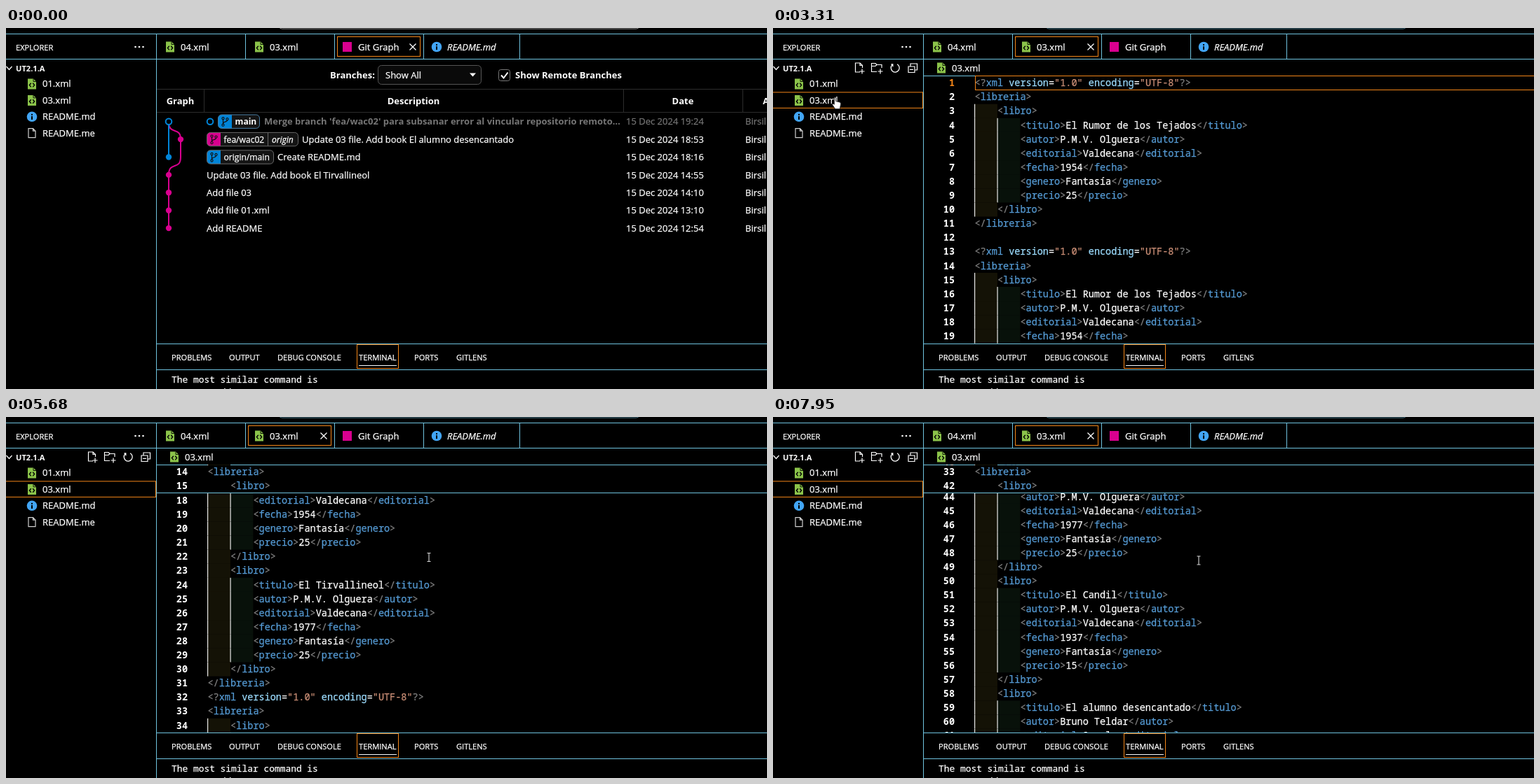
These frames come from a looping animation (1085x516 px, 8000 ms). An HTML page:

```html
<!DOCTYPE html>
<html lang="es">
<head>
<meta charset="utf-8">
<title>Editor</title>
<style>
html, body { margin: 0; width: 100%; height: 100%; overflow: hidden; background: #000; }
svg { display: block; width: 100vw; height: 100vh; }
text { font: 13px "Open Sans", "Noto Sans", sans-serif; color: #fff; fill: currentColor;
  stroke: currentColor; stroke-width: .25px; white-space: pre; }
.b { font-weight: 700; stroke-width: 0; }
.i { font-style: italic; }
.caps { font-size: 11.1px; }
.label { font-size: 12.1px; }
.mono { font: 13.52px "Noto Sans Mono", "DejaVu Sans Mono", monospace; }
.term { font: 12.9px "Noto Sans Mono", "DejaVu Sans Mono", monospace; }
.num { font-weight: 700; text-anchor: end; stroke-width: 0; }
.mid { text-anchor: middle; }
.dim { color: #757575; }
.act { color: #f38518; }
.br { color: #808080; } .tag { color: #569cd6; } .attr { color: #9cdcfe; } .str { color: #ce9178; }
</style>
</head>
<body>
<svg id="stage" viewBox="0 0 1085 516" preserveAspectRatio="none"></svg>
<script>
const BLUE = '#6fc3df', ORANGE = '#f38518', NODE = '#0085d9', PINK = '#d9008f';
const LH = 20.1, CW = 8.112, TOP = 68.5, LEFT = 287.5;
const LOOP = 8000, CLICK = 2580, OPEN = 2670, LOADED = 2840;

const text = (x, y, s, cls = '') => `<text x="${x}" y="${y + 4.7}" class="${cls}">${s}</text>`;
const path = (d, stroke, w = 1, extra = '') =>
  `<path d="${d}" fill="none" stroke="${stroke}" stroke-width="${w}" ${extra}/>`;
const rect = (x, y, w, h, fill, extra = '') =>
  `<rect x="${x}" y="${y}" width="${w}" height="${h}" fill="${fill}" ${extra}/>`;
const frame = (x, y, w, h, stroke, extra = '') =>
  rect(x + .5, y + .5, w - 1, h - 1, 'none', `stroke="${stroke}" ${extra}`);
const hline = (x, y, w, c) => rect(x, y, w, 1, c);
const vline = (x, y, h, c) => rect(x, y, 1, h, c);
const group = (id, body, extra = '') => `<g id="${id}" ${extra}>${body}</g>`;
const at = (x, y, body) => `<g transform="translate(${x} ${y})">${body}</g>`;

// Icons, each drawn around its centre
const xmlIcon = (x, y) => at(x, y,
  '<path d="M-6-7.5H2L6-3.5V7.5H-6Z" fill="#8bc34a"/>' +
  path('M2-7.5V-3.5H6', '#000', .9) +
  path('M-1.2-1.2L-3.6 1.6L-1.2 4.4M1.2-1.2L3.6 1.6L1.2 4.4', '#000', 1.4));
const infoIcon = (x, y) => at(x, y, '<circle r="7.3" fill="#42a5f5"/>' +
  rect(-1, -4, 2, 2, '#000') + rect(-1, -.8, 2, 5, '#000'));
const fileIcon = (x, y) => at(x, y, path('M-5-6.5H1.5L5-3V6.5H-5ZM1.5-6.5V-3H5', '#d0d0d0', 1.2));
const branchIcon = (x, y) => at(x, y, path('M-2.5-3V3.5M3.5-2.2C3.5 1.5-2.5-.5-2.5 3', '#111', 1.2) +
  '<g fill="none" stroke="#111" stroke-width="1.1"><circle cx="-2.5" cy="-4.5" r="1.6"/>' +
  '<circle cx="-2.5" cy="5" r="1.6"/><circle cx="3.5" cy="-3.5" r="1.6"/></g>');
const cross = (x, y) => at(x, y, path('M-4.5-4.5L4.5 4.5M4.5-4.5L-4.5 4.5', '#fff', 1.3));

function shell() {
  const files = ['01.xml', '03.xml', 'README.md', 'README.me'];
  const icons = [xmlIcon, xmlIcon, infoIcon, fileIcon];
  const panel = [[236, 'PROBLEMS'], [318, 'OUTPUT'], [387, 'DEBUG CONSOLE'], [503, 'TERMINAL'],
    [582, 'PORTS'], [642, 'GITLENS']];
  return hline(0, 8, 1085, BLUE) + hline(0, 44, 1085, BLUE) + vline(214, 8, 508, BLUE) +
    [341, 468, 595, 732].map(x => vline(x, 8, 36, BLUE)).join('') +
    text(14, 27.5, 'EXPLORER', 'caps') +
    [184.5, 190, 195.5].map(x => `<circle cx="${x}" cy="27" r="1.3" fill="#fff"/>`).join('') +
    path('M.5 55L4.5 59.5L8.5 55', '#fff', 1.2) + text(14, 57.5, 'UT2.1.A', 'caps b') +
    files.map((f, i) => icons[i](37, 80 + i * 23.4) + text(52, 79.7 + i * 23.4, f)).join('') +
    xmlIcon(234, 27) + text(249, 27.5, '04.xml') + xmlIcon(361, 27) + text(376, 27.5, '03.xml') +
    rect(480, 20, 13, 14, PINK) + text(502, 27.5, 'Git Graph') +
    infoIcon(614, 27) + text(629, 27.5, 'README.md', 'i') +
    hline(215, 451, 870, BLUE) + hline(215, 488, 870, BLUE) +
    panel.map(([x, s]) => text(x, 470, s, 'caps')).join('') +
    frame(500, 452, 60, 35, ORANGE) + hline(503, 482, 54, '#fff') +
    text(236, 502, 'The most similar command is', 'term') + text(298, 520, 'add', 'term');
}

function actions() {
  return at(123, 57, path('M1 6H-5.5V-7H1L4.5-3.5V0M1-7V-3.5H4.5M4 1.5V8.5M.5 5H7.5', '#fff', 1.2)) +
    at(148, 57, path('M0 5.5H-7.5V-6.5H-2L0-4.5H7V0M-7.5-2.5H-2L0-4.5M5 1.5V8.5M1.5 5H8.5', '#fff', 1.2)) +
    at(174, 57, path('M-4-4.2A6 6 0 1 0 3-5.2M-5.5-5H-3.2V-1.8', '#fff', 1.3)) +
    at(199, 57, path('M-6-2H3V6.5H-6ZM-3-2V-6H6.5V3H3M-4 2.3H1', '#fff', 1.2));
}

function badge(x, y, w, color, label, cls, border) {
  return rect(x + .5, y - 9.7, w - 1, 19.4, '#141414', 'rx="5"') +
    `<path d="M${x + 20} ${y - 9.7}H${x + 5.5}a5 5 0 0 0-5 5v9.4a5 5 0 0 0 5 5H${x + 20}Z" fill="${color}"/>` +
    frame(x, y - 10.2, w, 20.4, border, 'rx="5"') +
    branchIcon(x + 10, y) + text(x + 24.5, y - .3, label, 'label ' + cls);
}

function graphView() {
  const rows = [
    [368, 'Merge branch \'fea/wac02\' para subsanar error al vincular repositorio remoto…', '19:24'],
    [422, 'Update 03 file. Add book El alumno desencantado', '18:53'],
    [387, 'Create README.md', '18:16'],
    [286, 'Update 03 file. Add book El Tirvallineol', '14:55'],
    [286, 'Add file 03', '14:10'],
    [286, 'Add file 01.xml', '13:10'],
    [286, 'Add README', '12:54']];
  const rowY = i => 133.7 + i * 25.4;
  const dot = (x, i, c) => `<circle cx="${x}" cy="${rowY(i)}" r="4.2" fill="${c}"/>`;
  const ring = x => `<circle cx="${x}" cy="133.7" r="4.3" fill="#000" stroke="${NODE}" stroke-width="2"/>`;
  return text(462, 67.5, 'Branches:', 'b') + rect(530.5, 53.5, 147, 27, '#0a0a0a', 'stroke="#555" rx="5"') +
    text(541, 67.5, 'Show All') + '<path d="M661 64.5H670L665.5 69.5Z" fill="#fff"/>' +
    frame(702, 59, 17, 17, '#777', 'rx="3"') + path('M706 67.5L709.5 71.5L715.5 63.5', '#fff', 2) +
    text(726, 67.5, 'Show Remote Branches', 'b') +
    hline(215, 87, 870, '#2c2c2c') + hline(215, 120, 870, '#2c2c2c') +
    [282, 880, 1050].map(x => vline(x, 88, 32, '#2c2c2c')).join('') +
    text(248.5, 104.5, 'Graph', 'b mid') + text(581, 104.5, 'Description', 'b mid') +
    text(965, 104.5, 'Date', 'b mid') + text(1079, 104.5, 'Author', 'b') +
    path('M232 134C232 154 249 140 249 159V184.5C249 204 232 190 232 210V286', PINK, 2) +
    path('M232 134V184.5', NODE, 2) + ring(232) + dot(249, 1, PINK) + dot(232, 2, NODE) +
    [3, 4, 5, 6].map(i => dot(232, i, PINK)).join('') + ring(291) +
    badge(302, rowY(0), 60, NODE, 'main', 'b', '#4a7fa5') +
    badge(286, rowY(1), 131, PINK, 'fea/wac02', '', '#6a6a6a') +
    vline(373, rowY(1) - 9.5, 19, '#6a6a6a') + text(379, rowY(1) - .3, 'origin', 'label i') +
    badge(286, rowY(2), 96, NODE, 'origin/main', '', '#6a6a6a') +
    rows.map(([x, s, hour], i) => text(x, rowY(i), s, i ? '' : 'b dim') +
      text(884, rowY(i), '15 Dec 2024 ' + hour, i ? '' : 'dim') +
      text(1054, rowY(i), 'Birsil', i ? '' : 'dim')).join('');
}

// Code listing
const span = (cls, s) => `<tspan class="${cls}">${s}</tspan>`;
const tag = (name, end = '') => span('br', '&lt;' + end) + span('tag', name) + span('br', '&gt;');
const prolog = span('br', '&lt;?') + span('tag', 'xml') + span('attr', ' version') + '=' + span('str', '"1.0"') +
  span('attr', ' encoding') + '=' + span('str', '"UTF-8"') + span('br', '?&gt;');
const FIELDS = ['titulo', 'autor', 'editorial', 'fecha', 'genero', 'precio'];
const tale = (title, year, price) => [title, 'P.M.V. Olguera', 'Valdecana', year, 'Fantasía', price];
const A = tale('El Rumor de los Tejados', 1954, 25), B = tale('El Tirvallineol', 1977, 25);
const C = tale('El Candil', 1937, 15);
const D = ['El alumno desencantado', 'Bruno Teldar', 'Orvela', 1976, 'Ciencia ficción', 20];

const lines = [], shops = [], books = [];
const add = (depth, html = '') => lines.push({ depth, html });
function shop(list) {
  add(0, prolog);
  const start = add(0, tag('libreria'));
  for (const book of list) {
    const first = add(1, tag('libro'));
    book.forEach((v, i) => add(2, tag(FIELDS[i]) + v + tag(FIELDS[i], '/')));
    books.push([first, add(1, tag('libro', '/'))]);
  }
  shops.push([start, add(0, tag('libreria', '/'))]);
}
shop([A]);
add(0);
shop([A, B]);
shop([A, B, C, D]);

const lineTop = n => TOP + (n - 1) * LH;
function codeLine(n, y, guides) {
  const { depth, html } = lines[n - 1];
  let out = '';
  if (guides) for (let k = 0; k < depth; k++) {
    const x = LEFT + k * 4 * CW;
    out += rect(x, y, 4 * CW, LH + .1, k ? '#08110a' : '#141206') + rect(x - .5, y, 1.2, LH + .1, '#e8e8e8');
  }
  return out + text(259, y + 10, n, 'mono num' + (n === 1 ? ' act' : '')) +
    text(LEFT + depth * 4 * CW, y + 10, html, 'mono');
}

function editorView() {
  return xmlIcon(240, 57) + text(255, 57.5, '03.xml') + hline(215, 68, 870, BLUE) +
    group('code', '<g clip-path="url(#pane)">' + group('scroll',
      lines.map((_, i) => codeLine(i + 1, lineTop(i + 1), true)).join('') +
      frame(288, 68, 800, 21, ORANGE)) + group('sticky', '') + '</g>');
}

const tip = rect(69.5, 115.5, 546, 45, '#000', `stroke="${BLUE}"`) +
  text(80, 128, '~\\Documentos\\CICLO DESARROLLO APLICACIONES WEB\\CURSO 1\\ENTORNOS DE') +
  text(80, 148.5, 'DESARROLLO\\EJERCICIOS_Git\\UT2.1.A\\03.xml');

const pointers =
  group('hand', '<path d="M-3-8.5C-1.8-9.8-.8-9-.8-8V-3.5L4.5-2.2C6-1.7 6.3-.6 6 1L4.8 7.5H-1.8L-5.8 1.6' +
    'C-6.3.2-4.8-.4-3.2 1Z" fill="#fff" stroke="#222" stroke-width=".9"/>') +
  group('beam', path('M-2.5-6H2.5M0-6V6M-2.5 6H2.5', '#d8d8d8', 1.1)) +
  group('arrow', '<path d="M0 0V15L3.6 11.8L6 17L8.3 16L6 11H11Z" fill="#fff" stroke="#222" stroke-width=".9"/>');

document.getElementById('stage').innerHTML =
  '<defs><clipPath id="pane"><rect x="215" y="68" width="870" height="383"/></clipPath></defs>' +
  rect(0, 0, 1085, 516, '#000') + group('graph', graphView()) + group('editor', editorView()) +
  `<rect id="row" x="-.5" y="0" width="214" height="22.5" stroke="${ORANGE}"/>` + shell() +
  '<rect id="search" x="389.5" y="-20" width="513" height="21.2" rx="4" fill="#111"/>' +
  group('graphTab', frame(472, 12, 119, 29, ORANGE) + cross(580, 27)) +
  group('fileTab', frame(345, 12, 119, 29, ORANGE) + cross(453, 27)) +
  group('actions', actions()) + group('tip', tip) + group('pointer', pointers);

// Motion tables: [time, value...]
const MOVES = [[500, 840, 489], [620, 690, 482], [760, 460, 462], [880, 280, 390], [980, 165, 270], [1080, 95, 178],
  [1170, 60, 120], [1250, 50, 86], [1310, 50, 88], [1630, 61, 107], [3309, 61, 107], [3310, 90, 108],
  [3500, 190, 150], [3700, 400, 230], [3900, 575, 216], [4060, 603, 201], [7500, 603, 200], [7600, 607, 205]];
const SCROLLS = [[0, 0], [4060, 20.1], [4190, 37], [4470, 55], [4540, 72], [4740, 89.3], [4940, 142.4],
  [5080, 175], [5180, 195.4], [5280, 248.2], [5680, 301], [5810, 353.8], [6080, 406.5], [6280, 459.2],
  [6610, 512], [6810, 564.8], [7010, 591], [7095, 617.6], [7180, 644], [7265, 657], [7350, 670.5],
  [7550, 723.3], [7650, 750], [7750, 776.2], [7950, 829]];
const FADE = [[0, 0], [2040, .2], [2110, .6], [2180, 1], [CLICK, 0]];

const held = (table, t) => table.filter(k => k[0] <= t).pop()[1];
function glide(table, t) {
  const i = table.findIndex(k => k[0] > t);
  if (i < 0) return table[table.length - 1].slice(1);
  if (i === 0) return table[0].slice(1);
  const a = table[i - 1], b = table[i], p = (t - a[0]) / (b[0] - a[0]);
  return [a[1] + (b[1] - a[1]) * p, a[2] + (b[2] - a[2]) * p];
}

const $ = id => document.getElementById(id);
const show = (id, on) => $(id).setAttribute('display', on ? 'inline' : 'none');
const place = (id, x, y) => $(id).setAttribute('transform', `translate(${x} ${y})`);

// Enclosing tags stay pinned on top until their closing line pushes them out
function pinned(s) {
  const rows = [];
  for (const list of [shops, books]) {
    const y = TOP + rows.length * LH;
    const hit = list.find(([a, b]) => lineTop(a) - s < y - .3 && lineTop(b + 1) - s > y);
    if (!hit) break;
    rows.push([hit[0], Math.min(y, lineTop(hit[1]) - s)]);
  }
  if (!rows.length) return '';
  const end = rows[rows.length - 1][1] + LH;
  return rect(215, 69, 870, end - 69, '#000') +
    rows.reverse().map(([n, y]) => codeLine(n, y, false)).join('') +
    hline(215, Math.round(end - .5), 870, BLUE);
}

let lastScroll = -1;
function draw(t) {
  const opened = t >= OPEN, clicked = t >= CLICK, s = held(SCROLLS, t);
  show('graph', !opened);
  show('graphTab', !opened);
  show('editor', opened);
  show('fileTab', opened);
  show('code', t >= LOADED);
  $('search').setAttribute('stroke', opened ? '#3f6f80' : '#8a8a8a');
  if (s !== lastScroll) {
    place('scroll', 0, -s);
    $('sticky').innerHTML = pinned(s);
    lastScroll = s;
  }

  const [x, y] = glide(MOVES, t);
  const inSide = x < 214, hover = Math.floor((y - 68) / 23.4);
  const onFile = inSide && hover >= 0 && hover < 4;
  const beam = !inSide && (y > 488 || (opened && y > 68 && y < 451));
  show('pointer', t >= 500);
  place('pointer', x, y);
  show('hand', onFile);
  show('beam', beam);
  show('arrow', !onFile && !beam);
  show('actions', clicked || inSide);
  show('row', clicked || onFile);
  $('row').setAttribute('y', 68.5 + (clicked ? 1 : hover) * 23.4);
  $('row').setAttribute('fill', clicked ? 'none' : '#1a1a1a');
  $('row').setAttribute('stroke-dasharray', clicked ? 'none' : '2 1.5');
  $('tip').setAttribute('opacity', held(FADE, t));
}

function tick() {
  draw(performance.now() % LOOP);
  requestAnimationFrame(tick);
}
tick();
</script>
</body>
</html>
```
